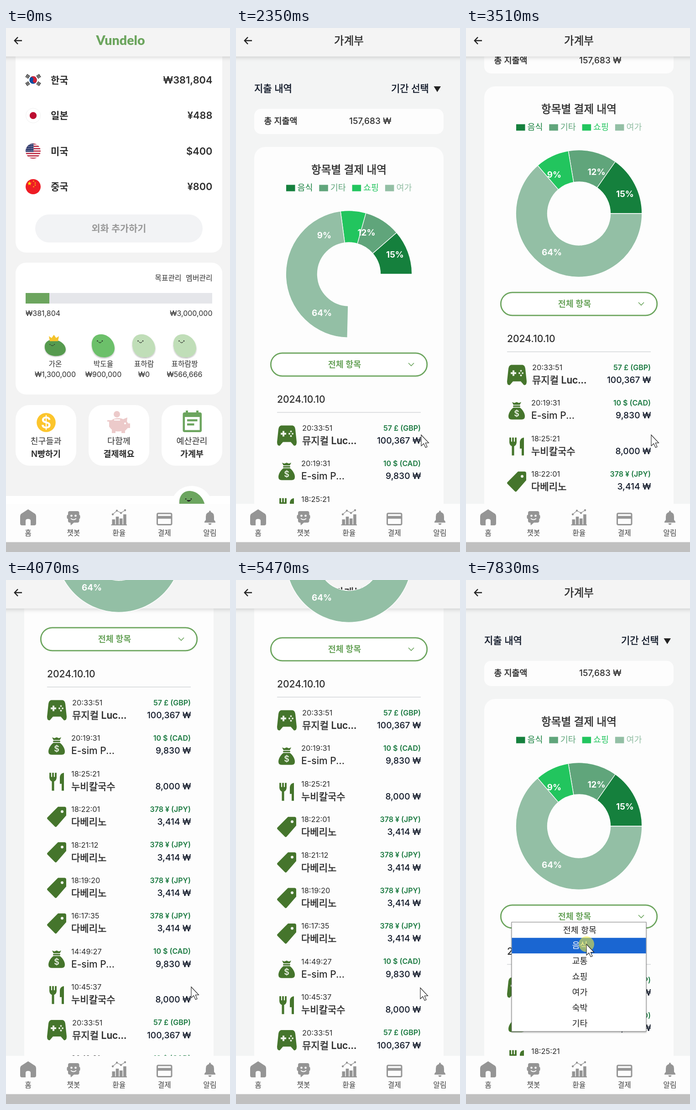
Recreate the animation shown at these times as an HTML page. Size 491 by 1141 pixels, loop 8 s.

```html
<!DOCTYPE html>
<html lang="ko">
<head>
<meta charset="utf-8">
<title>가계부</title>
<style>
html, body { margin: 0; width: 100%; height: 100%; overflow: hidden; background: #f3f3f3; }
svg { display: block; width: 100vw; height: 100vh; font-family: Inter, 'Noto Sans CJK KR', sans-serif; }
</style>
</head>
<body>
<svg id="stage" viewBox="0 0 491 1141"></svg>
<script>
const LOOP = 8000;
const INK = '#2e2e2e', NAVY = '#101828', GREEN = '#6ca55e', ICON = '#45752c', GREY = '#959595';

// Markup helpers; medium Hangul gets a hairline stroke because the font has no medium cut
const text = (x, y, s, size, weight = 400, fill = INK, anchor = 'start') => {
  const stroke = weight === 500 && /[가-힣]/.test(s) ? `stroke="${fill}" stroke-width=".55"` : '';
  return `<text x="${x}" y="${y}" font-size="${size}" font-weight="${weight}" fill="${fill}" text-anchor="${anchor}" ${stroke}>${s}</text>`;
};
const mid = (x, y, s, size, weight, fill) => text(x, y, s, size, weight, fill, 'middle');
const end = (x, y, s, size, weight, fill) => text(x, y, s, size, weight, fill, 'end');
const rect = (x, y, w, h, fill, r = 0, more = '') =>
  `<rect x="${x}" y="${y}" width="${w}" height="${h}" rx="${r}" fill="${fill}" ${more}/>`;
const circle = (x, y, r, fill, more = '') => `<circle cx="${x}" cy="${y}" r="${r}" fill="${fill}" ${more}/>`;
const path = (d, fill, more = '') => `<path d="${d}" fill="${fill}" ${more}/>`;
const line = (d, stroke, w, more = '') => path(d, 'none', `stroke="${stroke}" stroke-width="${w}" ${more}`);
const group = (x, y, body, more = '') => `<g transform="translate(${x} ${y}) ${more}">${body}</g>`;
const each = (n, f) => Array.from({ length: n }, (_, i) => f(i)).join('');

const header = title =>
  rect(-10, -10, 511, 72, '#f4f4f4', 0, 'filter="url(#soft)"') +
  line('M35 27.5H19.5M26 20L18.8 27.5L26 35', '#222', 2.5) + title;

// Flags
const star = (x, y, r) => path('M' + Array.from({ length: 10 }, (_, i) => {
  const a = i * Math.PI / 5 - Math.PI / 2, q = i % 2 ? r * .4 : r;
  return (x + q * Math.cos(a)).toFixed(1) + ' ' + (y + q * Math.sin(a)).toFixed(1);
}).join('L') + 'Z', '#ffde00');

const trigram = (x, y, angle) => group(x, y,
  each(3, i => rect(-4, -3.5 + i * 2.7, 8, 1.6, '#111')), `rotate(${angle})`);

const flags = [
  circle(0, 0, 16.5, '#fff') +
    `<g transform="rotate(30)">${circle(0, 0, 8.3, '#0b4da2')}${path('M-8.3 0A8.3 8.3 0 0 1 8.3 0A4.15 4.15 0 0 1 0 0A4.15 4.15 0 0 0 -8.3 0Z', '#cd2337')}</g>` +
    trigram(-12, -8, -56) + trigram(12, -8, 56) + trigram(-12, 8, 56) + trigram(12, 8, -56),
  circle(0, 0, 16, '#fff', 'stroke="#f0f0f0"') + circle(0, 0, 7.6, '#bc0c30'),
  `<g clip-path="url(#round)">${rect(-17, -17, 34, 34, '#fff')}` +
    each(7, i => rect(-17, -17 + i * 5.2, 34, 2.6, '#b9233c')) +
    rect(-17, -17, 18, 18.6, '#2f3b6e') +
    each(20, i => circle(-14 + i % 5 * 3.4, -14 + (i / 5 | 0) * 4.2, .8, '#fff')) + '</g>',
  circle(0, 0, 16.5, '#ee1c25') + star(-8, -7, 5) +
    star(1, -12, 2) + star(4.5, -8, 2) + star(4.5, -3.5, 2) + star(1, 0, 2)
];

// Home page
const bean = (x, y, sx, sy, fill) => group(x, y,
  path('M1 20C2 6 12 0 23 1C38 2 51 16 51 31C51 44 41 51 28 51C10 51 0 38 1 20Z', fill, 'filter="url(#drop)"') +
  circle(13.5, 15.5, 1.2, '#222') + circle(24, 15.5, 1.2, '#222') +
  line('M16 17.5Q19 21.5 22 17.5', '#222', 1.2), `scale(${sx} ${sy})`);

const member = (x, name, sum) => mid(x, 737, name, 15.8) + mid(x, 760, sum, 16);
const tile = (x, top, bottom, icon) => rect(x, 821, 133, 132, '#fff', 31) + icon +
  mid(x + 66.5, 906, top, 18.5) + mid(x + 66.5, 934, bottom, 18.5, 600);

const coin = circle(88, 859, 20.8, '#fcc52c') + mid(88, 871.5, '$', 35, 600, '#fff');
const piggy = `<g fill="#eccaca">${circle(243, 841, 7, '#eccaca')}
  <ellipse cx="246" cy="864" rx="20" ry="14.5"/>
  <path d="M254 853L266 848L265 857L268 861H272V871H267L261 877V882H253V877H240V882H232V874L226 868V857H222V854H228Z"/></g>` +
  line('M237 853.5H250', '#fff', 2.5) + circle(261, 861, 2, '#fff');
const calendar = rect(387.5, 837, 41.5, 43, GREEN, 4) +
  rect(394, 833, 5, 7, GREEN) + rect(417, 833, 5, 7, GREEN) + rect(392, 847, 32.5, 28.5, '#fff') +
  rect(397, 852, 22.5, 4.5, GREEN) + rect(397, 861, 15.5, 4.5, GREEN);

const wallet = [['한국', '₩381,804'], ['일본', '¥488'], ['미국', '$400'], ['중국', '¥800']];
const home =
  rect(0, 0, 491, 1141, '#f3f3f3') +
  rect(21, 20, 453, 469, '#fff', 23) +
  wallet.map(([name, sum], i) => {
    const y = 113.3 + i * 77.4;
    return group(59.5, y, flags[i]) + text(98, y + 7.5, name, 21, 600) + end(452.5, y + 7.5, sum, 21.8, 600);
  }).join('') +
  rect(64, 406, 367, 61, '#f2f3f5', 30.5) + mid(247.5, 444, '외화 추가하기', 20.8, 600, '#999') +
  rect(21, 511, 453, 287, '#fff', 23) +
  end(384.5, 549.5, '목표관리', 15.8) + end(452.5, 549.5, '멤버관리', 15.8) +
  rect(43, 577, 409, 23, '#e5e6ea') + rect(43, 577, 52, 23, GREEN) +
  text(43, 627, '₩381,804', 16) + end(452.5, 627, '₩3,000,000', 16) +
  bean(84, 678, .92, .71, '#569b4f') + path('M96 682L94 671L100 675L105 668L110 675L116 671L114 682Z', '#f4c32b') +
  bean(187, 666, 1, 1, '#6cc06b') + bean(276, 666, 1, 1, '#c0deb8') + bean(366, 666, 1, 1, '#c0deb8') +
  member(108, '가온', '₩1,300,000') + member(213.5, '박도율', '₩900,000') +
  member(302.5, '표하람', '₩0') + member(391.5, '표하람짱', '₩566,666') +
  tile(21, '친구들과', 'N빵하기', coin) + tile(181, '다함께', '결제해요', piggy) + tile(341, '예산관리', '가계부', calendar) +
  rect(0, 1019, 491, 20, '#fff') + circle(407, 1043, 46, '#fff') + bean(379, 1007, 1.12, 1.2, GREEN) +
  path('M396 1028Q401 1034 406 1028Z', '#222') +
  header(`<g style="font-family: Lato, sans-serif">${mid(251, 37, 'Vundelo', 28.5, 900, GREEN)}</g>`);

// Ledger page
const icons = {
  game: path('M9 0H34Q39 1 40 8L43 36Q43 45 37 44L30 36H13L6 44Q0 45 0 36L3 8Q4 1 9 0Z', ICON) +
    line('M14 12V24M8 18H20', '#eef3ea', 4) + circle(27, 18, 2, '#eef3ea') + circle(34, 18, 2, '#dfe8d8') +
    circle(30.5, 13, 2, '#dfe8d8') + circle(30.5, 23, 2, '#eef3ea'),
  bag: path('M11 1L16 3L21 1L26 3L31 1L28 7H14Z', ICON) + rect(13, 8.5, 16, 3, ICON, 1.5) +
    path('M14 13H28C35 18 39 26 39 32Q39 39 32 39H10Q3 39 3 32C3 26 7 18 14 13Z', ICON) +
    mid(21, 32.5, '$', 18, 600, '#e6eee0'),
  meal: line('M7 1V11M13 1V11M19 1V11', ICON, 3.8) + path('M5 10H21Q21 18 15.5 20V40H10.5V20Q5 18 5 10Z', ICON) +
    path('M37 1V40H32V25H28V10Q29 2 37 1Z', ICON),
  tag: path('M24 0H38Q42 0 42 4V19L21 43Q19 45 17 43L1 27Q-1 25 1 23Z', ICON) + circle(33, 10.5, 3, '#f4f8f1')
};
const kinds = {
  show: ['game', '뮤지컬 Luc...', '57 £ (GBP)', '100,367 ₩', 145],
  sim: ['bag', 'E-sim P...', '10 $ (CAD)', '9,830 ₩', 143],
  noodle: ['meal', '누비칼국수', '', '8,000 ₩', 143],
  wear: ['tag', '다베리노', '378 ¥ (JPY)', '3,414 ₩', 143]
};
const spends = [['20:33:51', 'show'], ['20:19:31', 'sim'], ['18:25:21', 'noodle'], ['18:22:01', 'wear'],
  ['18:21:12', 'wear'], ['18:19:20', 'wear'], ['16:17:35', 'wear'], ['14:49:27', 'sim'], ['10:45:37', 'noodle']];

const row = i => {
  const [time, kind] = spends[i % spends.length];
  const [icon, name, foreign, sum, x] = kinds[kind];
  return group(0, 871 + i * 77.4,
    group(90, icon === 'bag' || icon === 'meal' ? -3 : -5.5, icons[icon]) +
    text(x, 6, time, 16.4) + text(x, 35, name, 21, 500) +
    end(405, 5.5, foreign, 16, 600, '#1b7a41') + end(405.5, 34, sum, 19.2, 500, NAVY));
};

const shades = ['#15803d', '#60a57b', '#22c55e', '#93bfa5'];
const legend = ['음식', '기타', '쇼핑', '여가'].map((s, i) =>
  rect(110 + i * 72.3, 341.5, 19.5, 14, shades[i]) + text(134.5 + i * 72.3, 353.5, s, 18.5, 400, shades[i])).join('');

const ledgerBody =
  text(40, 138.5, '지출 내역', 21, 500, NAVY) + text(340, 138.5, '기간 선택', 21, 500, NAVY) +
  path('M433.5 127H449L441.2 139.5Z', '#222') +
  rect(40, 176, 415, 55, '#fdfdfd', 15) + text(61.5, 209, '총 지출액', 18.5, 500) +
  `<g id="total">${text(248, 209, '157,683 ₩', 19, 500)}</g>` +
  rect(40, 259, 415, 1700, '#fdfdfd', 24) +
  mid(247.5, 316.5, '항목별 결제 내역', 23.7, 500) + legend +
  rect(76.3, 707.8, 342.5, 50, '#fff', 25, `stroke="${GREEN}" stroke-width="2.8"`) +
  mid(238, 739, '전체 항목', 18.5, 600, GREEN) + line('M378 729.5L384 735.5L390 729.5', GREEN, 1.6) +
  `<g id="rows">${text(90, 816, '2024.10.10', 21.1, 500)}${rect(90, 836.3, 315, 1.4, '#d2d4d8')}${each(13, row)}</g>`;

const labels = [[348.5, 493, '15%'], [286, 445, '12%'], [193.5, 451, '9%'], [188, 620, '64%']]
  .map(([x, y, s]) => mid(x, y + 6.5, s, 18.8, 700, '#fff')).join('');

// Bottom navigation
const peaks = [[234, 1059], [243, 1051], [252, 1056], [261, 1050]];
const bars = [1070, 1064, 1068, 1059];
const nav = rect(0, 1036, 491, 84, '#fdfdfd') + rect(0, 1119.5, 491, 22, '#c0c0c0') +
  path('M48.5 1048L64 1058Q66 1060 66 1063V1079Q66 1083 62 1083H54V1073Q54 1069 48.5 1069T43 1073V1083H35Q31 1083 31 1079V1063Q31 1060 33 1058Z', GREY) +
  rect(136, 1052, 24.5, 25, GREY, 4) + rect(133.5, 1060, 29, 9, GREY, 3) + path('M141 1076H150L142 1083Z', GREY) +
  circle(143.5, 1062, 2.3, '#fff') + circle(152.5, 1062, 2.3, '#fff') + line('M142 1068Q148 1073 154 1068', '#fff', 1.8) +
  bars.map((y, i) => rect(232.5 + i * 8.2, y, 6.6, 1082 - y, GREY)).join('') +
  rect(230.5, 1081, 34.5, 2, GREY) + line('M' + peaks.join('L'), GREY, 1.3) +
  peaks.map(([x, y]) => circle(x, y, 2.2, GREY)).join('') +
  rect(331.5, 1057, 31.5, 24.5, 'none', 2.5, `stroke="${GREY}" stroke-width="3"`) + rect(331, 1062.5, 32, 6, GREY) +
  path('M447 1051Q449 1051 449 1054Q456 1056 456 1064V1071L459 1075V1077H435V1075L438 1071V1064Q438 1056 445 1054Q445 1051 447 1051ZM443.5 1078.5H450.5Q450 1082 447 1082T443.5 1078.5Z', GREY) +
  ['홈', '챗봇', '환율', '결제', '알림'].map((s, i) => mid(48.5 + i * 99.6, 1104.5, s, 15.8, 400, '#444')).join('');

const options = ['전체 항목', '음식', '교통', '쇼핑', '여가', '숙박', '기타'];
const menu = hover => rect(100, 745, 295, 238, '#fff', 0, 'stroke="#777" filter="url(#drop)"') +
  rect(100.5, 745.3 + hover * 33.9, 294, 33.9, '#1a66d2') +
  options.map((s, i) => mid(249.5, 768.5 + i * 33.9, s, 18.5, 400, i === hover ? '#fff' : '#222')).join('');

const stage = document.getElementById('stage');
stage.innerHTML = `<defs>
  <filter id="soft" x="-10%" y="-30%" width="120%" height="180%"><feDropShadow dx="0" dy="3" stdDeviation="4" flood-opacity=".14"/></filter>
  <filter id="drop" x="-20%" y="-20%" width="140%" height="140%"><feDropShadow dx="0" dy="2" stdDeviation="1.5" flood-opacity=".28"/></filter>
  <clipPath id="round"><circle r="16.5"/></clipPath></defs>
  <g id="home">${home}</g>
  <g id="ledger">${rect(0, 0, 491, 1141, '#f3f4f4')}<g id="body">${ledgerBody}</g>
    ${header(mid(247.5, 35.5, '가계부', 23.5, 500))}
    <g id="donut"><g id="slices"></g>${labels}</g></g>
  ${nav}<g id="menu"></g>
  <circle id="press" r="17" fill="#f2ea3c" fill-opacity=".58"/>
  <path id="pointer" d="M0 0V24L5.5 19L9.5 27.5L13 26L9.3 17.5H16.5Z" fill="#fff" stroke="#222" stroke-width="1.1"/>`;
const el = id => document.getElementById(id);
const show = (id, on) => el(id).setAttribute('display', on ? 'inline' : 'none');
const move = (id, x, y) => el(id).setAttribute('transform', `translate(${x} ${y})`);

// Progress in n discrete steps, the first at t0 and the last near t1
const steps = (t, t0, t1, n) =>
  t < t0 ? 0 : Math.min(1, (Math.floor((t - t0) / (t1 - t0) * (n - 1) + .26) + 1) / n);
const mix = (a, b, p) => a + (b - a) * p;

// cubic-bezier(.25, .1, .25, 1)
function ease(x) {
  let lo = 0, hi = 1, s = .5;
  for (let i = 0; i < 24; i++) {
    s = (lo + hi) / 2;
    if (.75 * s * (1 - s) + s ** 3 < x) lo = s; else hi = s;
  }
  return .3 * s * (1 - s) ** 2 + 3 * s * s * (1 - s) + s ** 3;
}

function scrollAt(t) {
  const near = 529, far = 741;
  if (t < 4000) return near * steps(t, 3390, 3730, 6) ** 2;
  if (t < 5350) return mix(near, far, steps(t, 4000, 4270, 5) ** 1.134);
  if (t < 5810) return mix(far, near, steps(t, 5350, 5540, 4));
  return mix(near, 0, steps(t, 5810, 5940, 3));
}

function pointerAt(t) {
  if (t < 4270) {
    const p = steps(t, 190, 610, 7), q = 1 - p;
    return [493 * q * q + 2 * 366 * p * q + 406 * p * p, 1190 * q * q + 2 * 888 * p * q + 886 * p * p];
  }
  if (t < 4680) return [399, 878];
  if (t < 7210) {
    const p = steps(t, 6080, 6280, 4);
    return [mix(404, 275, p), mix(888, 737, p)];
  }
  const p = steps(t, 7210, 7410, 4);
  return [mix(275, 264, p), mix(737, 793, p)];
}

const amounts = [24000, 19660, 13656, 100367];

function slices(sweep) {
  const outer = 138.3, inner = 69;
  const turn = sweep * 2 * Math.PI * .99999 / amounts.reduce((a, b) => a + b);
  const at = (r, a) => (247.5 + r * Math.cos(a)).toFixed(2) + ' ' + (536 - r * Math.sin(a)).toFixed(2);
  let a = 0;
  return amounts.map((amount, i) => {
    const b = a + amount * turn, big = b - a > Math.PI ? 1 : 0;
    const d = `M${at(outer, a)}A${outer} ${outer} 0 ${big} 0 ${at(outer, b)}L${at(inner, b)}A${inner} ${inner} 0 ${big} 1 ${at(inner, a)}Z`;
    a = b;
    return path(d, shades[i], 'stroke="#fff" stroke-width="1.3"');
  }).join('');
}

function draw(t) {
  const inLedger = t >= 1210, loaded = t >= 1275;
  show('home', !inLedger);
  show('ledger', inLedger);
  show('rows', loaded);
  show('total', loaded);

  const y = -Math.round(scrollAt(t));
  move('body', 0, y);
  move('donut', 0, y);
  show('donut', t >= 1680);
  const tick = 67.3, run = Math.floor((t - 1663) / tick) * tick;
  el('slices').innerHTML = t >= 1680 ? slices(ease(Math.min(1, Math.max(.012, run / 1500)))) : '';

  const [px, py] = pointerAt(t);
  show('pointer', t >= 190);
  move('pointer', px, py);
  move('press', px, py);
  show('press', t >= 940 && t < 1210 || t >= 6630 && t < 6680 || t >= 7830);
  el('menu').innerHTML = t >= 6630 ? menu(py > 779 ? 1 : 0) : '';
}

function frame() {
  draw(performance.now() % LOOP);
  requestAnimationFrame(frame);
}
frame();
</script>
</body>
</html>
```
